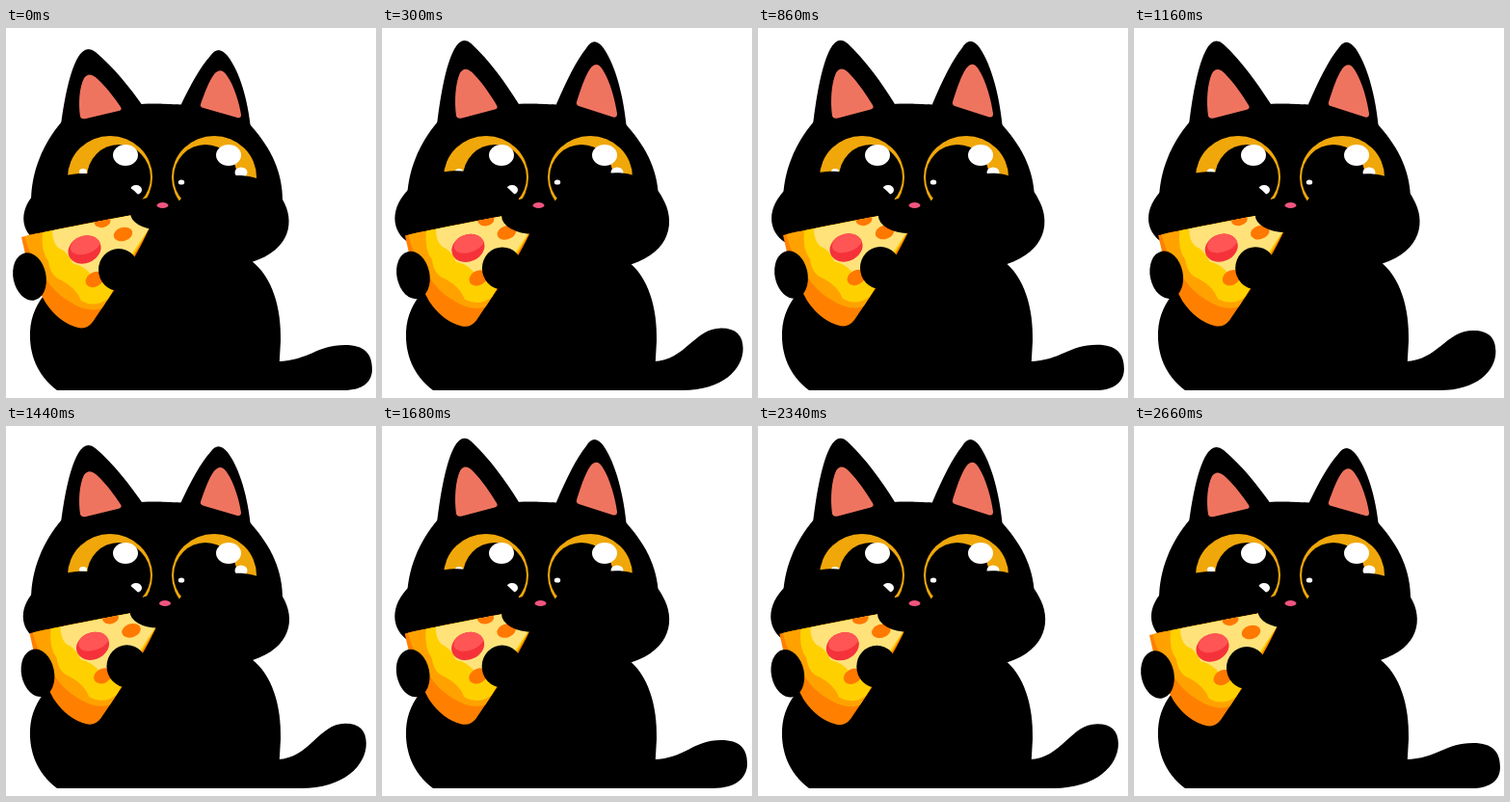
Animation, 384 px wide and 384 px high, one loop 2680 ms. Source, as an HTML page with a canvas:

```html
<!DOCTYPE html>
<html>
<head>
<meta charset="utf-8">
<style>
  html, body { margin: 0; width: 100%; height: 100%; overflow: hidden; background: #fff; }
  canvas { display: block; width: 100vmin; height: 100vmin; }
</style>
</head>
<body>
<canvas id="stage" width="384" height="384"></canvas>
<script>
const LOOP = 2680, CHEW = LOOP / 4, TAIL = LOOP / 3, BLINK = LOOP / 2;
const ctx = document.getElementById('stage').getContext('2d');

const shape = d => new Path2D(d);
const head = shape('M58 97C95 72 225 72 254 101C276 126 287 150 287 180L285 215L255 243L50 230L26 180C26 150 38 120 58 97Z');
const body = shape('M60 220L240 225L255 242C276 258 286 290 285 325L283 360L284 376L53 376C32 360 24 338 25 315C26 298 32 286 42 274Z');
const ears = shape('M57 101C61 70 67 43 75 30Q83 17 93 25C111 40 129 62 142 81L142 105ZM181 81C192 58 202 40 212 29Q220 17 230 29C243 46 251 75 254 104L181 105Z');
const innerEars = shape('M77 92C75 78 76 62 81 52Q86 45 94 52C104 61 113 73 119 82Q121 85 117 86L83 94Q78 95 77 92ZM202 79C206 68 210 56 216 48Q223 40 229 49C237 60 242 78 244 90Q244 94 240 93L205 83Q201 82 202 79Z');
const cheeks = shape('M27 175C45 152 75 148 100 153C122 157 136 170 146 183L150 215L40 225C18 218 11 195 27 175ZM178 182C190 165 215 153 240 153C262 153 280 163 287 178C300 200 296 230 255 243L180 230Z');

const slice = shape('M16 217Q40 211 131 194L149 207Q138 232 115 268L90 305Q84 313 75 311Q55 306 41 285Q23 255 16 217Z');
const crumbs = [
  ['#ffa200', 'M19 215L131 194L149 207L100 291Q84 296 66 284Q50 275 40 258Q25 240 19 215Z'],
  ['#ffd000', 'M38 212L131 194L149 207L106 281Q92 291 78 283Q73 270 58 262Q46 258 44 242Q36 232 38 212Z'],
  ['#ffe27a', 'M48 210L131 194L149 207L112 262Q102 256 90 258Q82 247 69 244Q64 232 54 228Q48 222 48 210Z']
].map(([color, d]) => [color, shape(d)]);

const mix = (a, b, u) => a + (b - a) * u;

// Eased interpolation through [time, value] pairs.
function track(t, keys) {
  const i = Math.max(1, keys.findIndex(k => k[0] >= t));
  const [t0, a] = keys[i - 1], [t1, b] = keys[i];
  const u = (t - t0) / (t1 - t0);
  return mix(a, b, u * u * (3 - 2 * u));
}

function fill(path, color = '#000') {
  ctx.fillStyle = color;
  ctx.fill(path);
}

function oval(x, y, rx, ry, color = '#000', angle = 0) {
  ctx.beginPath();
  ctx.ellipse(x, y, rx, ry, angle, 0, 7);
  ctx.fillStyle = color;
  ctx.fill();
}

function group(draw) {
  ctx.save();
  draw();
  ctx.restore();
}

function drawTail(u) {
  const top = mix(329, 306, u), tip = mix(380, 373, u);
  ctx.beginPath();
  ctx.moveTo(270, 348);
  ctx.lineTo(282, 346);
  ctx.bezierCurveTo(315, 345, mix(322, 325, u), top, 352, top);
  ctx.bezierCurveTo(mix(372, 366, u), top, tip, mix(338, 313, u), tip, mix(354, 326, u));
  ctx.bezierCurveTo(tip, mix(367, 350, u), mix(371, 348, u), 376, mix(350, 300, u), 376);
  ctx.lineTo(260, 376);
  ctx.fillStyle = '#000';
  ctx.fill();
}

function drawEye(x, pupilX, shines) {
  group(() => {
    oval(x, 155, 44, 43, '#f0a70a');
    ctx.clip();
    oval(pupilX, 155, 33, 34);
    for (const [sx, sy, rx, ry] of shines) oval(sx, sy, rx, ry, '#fff');
  });
}

function drawPizza() {
  fill(slice, '#ff8000');
  group(() => {
    ctx.clip(slice);
    for (const [color, path] of crumbs) fill(path, color);
    oval(100, 201, 8.5, 6, '#ff7800', -.2);
    oval(121.5, 214, 10, 7, '#ff7800', -.3);
    oval(92, 261, 10, 7.5, '#ff7800', -.5);
    oval(81.5, 230, 17.5, 14, '#f5323a', -.4);
    group(() => {
      ctx.clip();
      oval(83, 224, 17, 10, '#ff5555', -.4);
    });
  });
  oval(24.5, 258, 17, 25, '#000', -.2);
  oval(117, 251, 21, 22);
}

function draw(t) {
  const phase = t % CHEW;
  const puff = track(phase, [[0, 0], [90, .08], [200, .85], [330, 1], [580, .5], [CHEW, 0]]);
  const stretch = (Math.floor(t / CHEW) === 1 ? 15 : 9) * Math.sin(Math.PI * phase / CHEW) ** 2;
  const lidY = track(t % BLINK, [[0, 62], [470, 62], [610, 131], [750, 62], [BLINK, 62]]);
  const bite = track(t, [[0, 0], [240, 8], [600, 6.5], [860, 10], [1440, 8.5], [1920, 6.8],
    [2010, 0], [2140, 6], [2340, 6.3], [2480, 6], [2650, 0], [LOOP, 0]]);
  const noseX = 162.5 + track(t, [[0, 0], [1200, 0], [1440, 2.5], [1920, 1.5], [2200, 0], [LOOP, 0]]);

  ctx.fillStyle = '#fff';
  ctx.fillRect(0, 0, 384, 384);
  drawTail((1 - Math.cos(2 * Math.PI * t / TAIL)) / 2);
  fill(body);
  fill(head);

  drawEye(108, 117, [[124, 132, 13, 11], [80, 149, 4, 3], [135, 168, 6, 5]]);
  drawEye(216, 207, [[231, 132, 13, 11], [244, 150, 6.5, 5.5], [182, 160, 3.2, 2.6]]);
  group(() => {
    ctx.clip(head);
    oval(113, lidY, 52, 45);
    oval(216, lidY - 9, 50, 45);
  });

  group(() => {
    ctx.translate(0, 98);
    ctx.scale(1, 1 + stretch / 75);
    ctx.translate(0, -98);
    fill(ears);
    fill(innerEars, '#ef7460');
  });
  group(() => {
    ctx.translate(162, 200);
    ctx.scale(1 + .035 * puff, 1 + .06 * puff);
    ctx.translate(-162, -200);
    fill(cheeks);
  });
  group(() => {
    ctx.translate(bite, -.2 * bite);
    drawPizza();
  });
  oval(157, 192 + 3 * puff, 28 + 5 * puff, 17 + 2 * puff);
  oval(noseX, 184, 6, 3, '#f0557f');
}

function frame() {
  draw(performance.now() % LOOP);
  requestAnimationFrame(frame);
}
frame();
</script>
</body>
</html>
```
